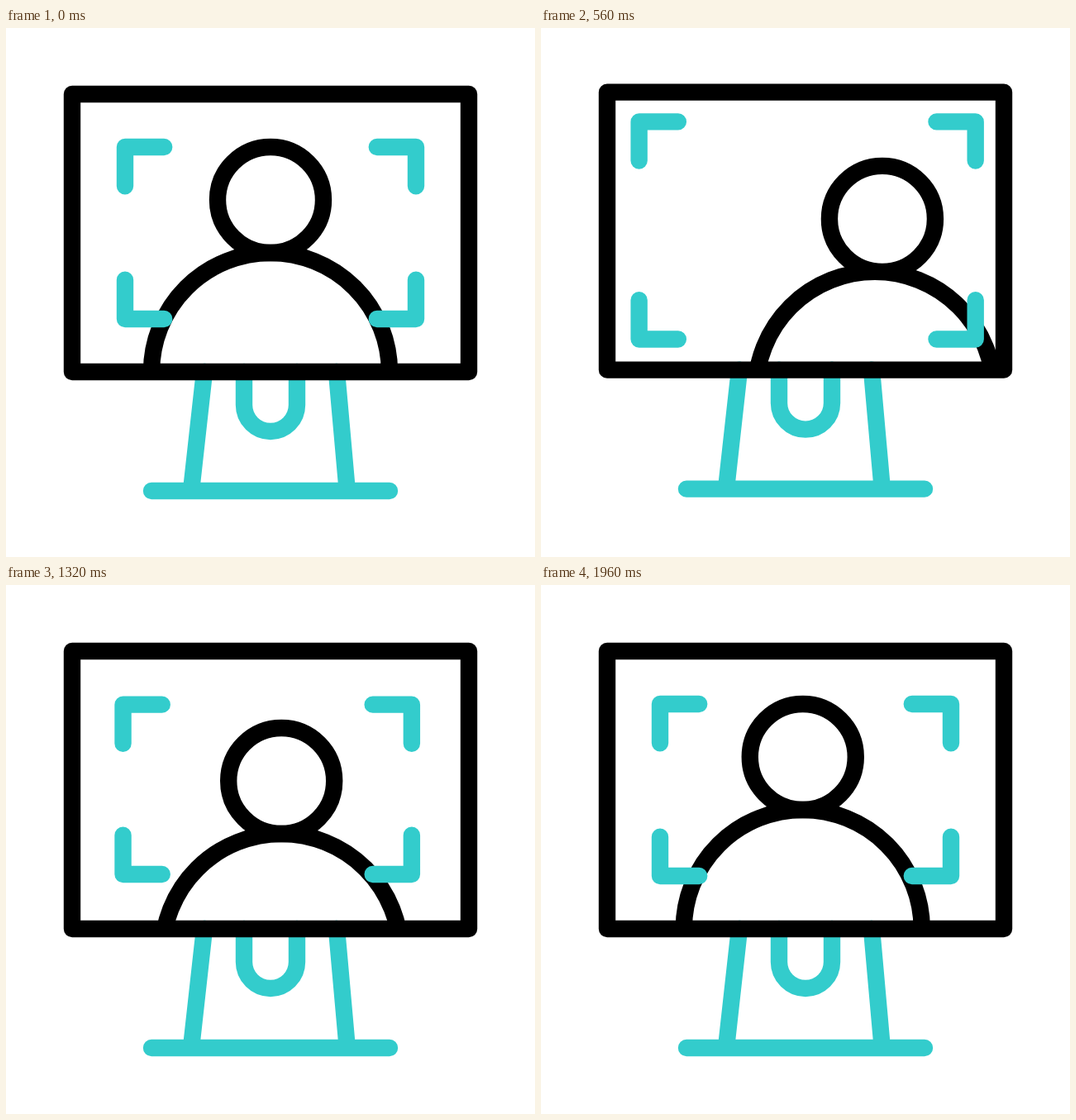
An HTML page that plays this animation: 640 px wide and 640 px high, repeating every 2 s.

```html
<!DOCTYPE html>
<html>
<head>
<meta charset="utf-8">
<style>
  html, body { margin: 0; width: 100%; height: 100%; overflow: hidden; background: #fff; }
  svg { display: block; width: 100%; height: 100%; }
  svg g { fill: none; stroke-width: 20.4; stroke-linecap: round; stroke-linejoin: round; }
  .teal { stroke: #3cc; }
  .ink { stroke: #000; }
</style>
</head>
<body>
<svg viewBox="0 0 640 640">
  <clipPath id="screen"><path d="M90 90H550V416H90Z"/></clipPath>
  <g id="monitor">
    <g class="teal">
      <path d="M240 416L224 560M400 416L412.8 560M176 560H464M288 416V456A32 32 0 0 0 352 456V416"/>
    </g>
    <g class="ink" clip-path="url(#screen)">
      <path id="body" d="M176 450V416A144 144 0 0 1 464 416V450"/>
      <circle id="head" cx="320" cy="208" r="64"/>
    </g>
    <path class="ink" fill="none" stroke-width="20.4" d="M80 80H560V416H80Z"/>
    <g class="teal">
      <path id="corners"/>
      <path id="rays"/>
    </g>
  </g>
</svg>
<script>
const LOOP = 2000, STEP = 40, ARM = 47.2;
const el = id => document.getElementById(id);
const move = (id, x, y) => el(id).setAttribute("transform", `translate(${x} ${y})`);
const trace = (id, parts) => el(id).setAttribute("d", parts.join(""));

// Inner point, then outer point
const rays = [
  [334, 179.8, 314, 159.7],
  [325.5, 209.5, 295.7, 205.8],
  [325.3, 241.8, 301.8, 249.9]
];

function ray([x1, y1, x2, y2], from, to) {
  const at = k => `${x1 + (x2 - x1) * k} ${y1 + (y2 - y1) * k}`;
  return `M${at(from)}L${at(to)}`;
}

// sx, sy: which side of the centre the corner lies on
function corner(cx, cy, sx, sy, spread) {
  const x = cx + sx * (176 + spread), y = cy + sy * (104 + spread);
  return `M${x - sx * ARM} ${y}H${x}V${y - sy * ARM}`;
}

function draw(t) {
  // Eased 0..1 progress between two times
  const ramp = (from, to, power = 1) => {
    const k = Math.min(1, Math.max(0, (t - from) / (to - from))) ** power;
    return k * k * (3 - 2 * k);
  };
  const widen = ramp(80, 600), narrow = ramp(1040, 1424), settle = ramp(1700, 1940);

  move("monitor", 0, 28 * ramp(80, 320) - 36 * ramp(320, 640) + 8 * ramp(640, 840));

  const x = 87 * ramp(80, 622) - 153.5 * ramp(1040, 1680, .87) + 66.5 * ramp(1700, 2000);
  const y = 29 * (ramp(352, 620) - settle);
  const lean = 16 * (ramp(440, 660) - ramp(1040, 1240));
  move("body", x, y);
  move("head", x + lean, y);

  const spread = 28 * widen - 35.8 * narrow + 7.8 * settle;
  const cx = 320 + 2.2 * widen - 6 * ramp(1040, 1320) + 3.8 * settle;
  const cy = 248 - .7 * (widen - settle);
  const sides = [-1, 1];
  trace("corners", sides.flatMap(sx => sides.map(sy => corner(cx, cy, sx, sy, spread))));

  const tail = ramp(840, 1180), tip = ramp(680, 940);
  trace("rays", tip > tail ? rays.map(r => ray(r, tail, tip)) : []);
}

function tick() {
  draw(Math.floor(performance.now() % LOOP / STEP) * STEP);
  requestAnimationFrame(tick);
}
tick();
</script>
</body>
</html>
```
